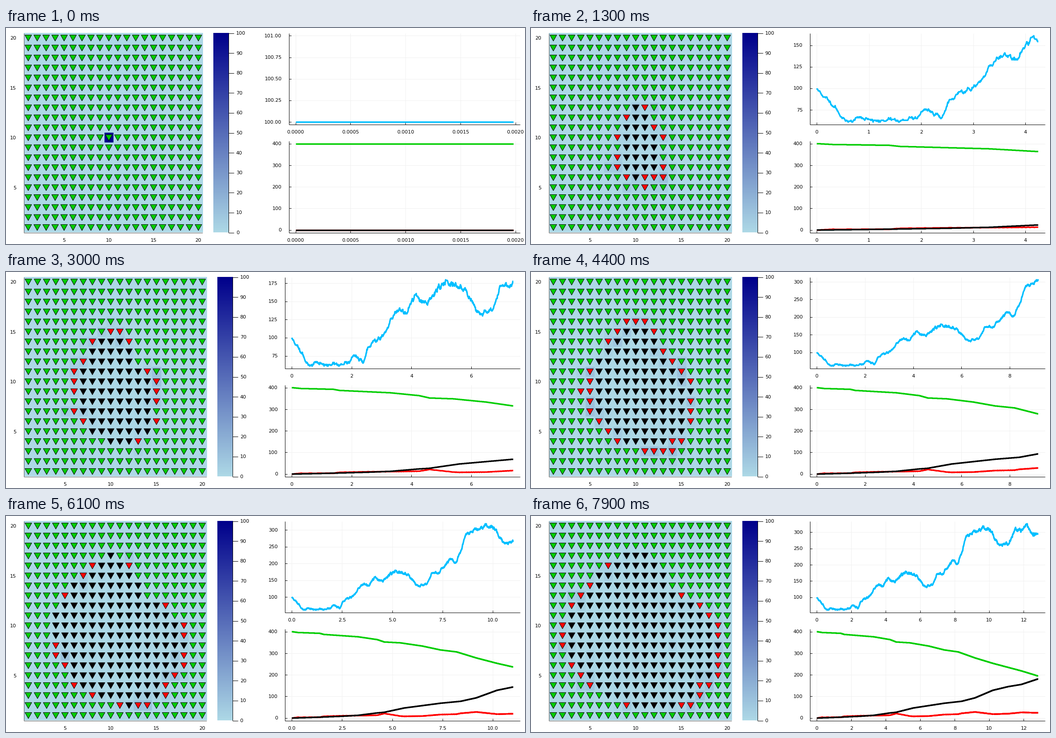
A matplotlib script for the animation above (8 s loop, 1159x483 px).

```python
import math

import matplotlib.pyplot as plt
import numpy as np
from matplotlib.animation import FuncAnimation
from matplotlib.collections import LineCollection, PolyCollection
from matplotlib.colors import LinearSegmentedColormap

W, H, DPI = 1159, 483, 128
PX = 72 / DPI
FRAMES, INTERVAL = 80, 100
N = 20
GREEN, RED, BLACK, BLUE = "#00cd00", "#ff0000", "#000000", "#00bfff"
HEAT = LinearSegmentedColormap.from_list("heat", ["#add8e6", "#00008b"])
rng = np.random.default_rng(7)

# Turning points as (time, count)
BEETLES = np.array([
    (0, 100), (.2, 88), (.62, 60), (.85, 66), (1, 62), (1.75, 63), (2.1, 76),
    (2.4, 67), (2.5, 81), (2.77, 98), (2.95, 97), (3.5, 138), (3.85, 134),
    (4.15, 159), (4.4, 146), (5.15, 178), (5.7, 168), (6.3, 131),
    (6.75, 143), (7, 173), (7.35, 176), (7.9, 214), (8.2, 204), (8.68, 286),
    (9.65, 314), (10.05, 308), (10.55, 259), (11.1, 264), (11.5, 309),
    (11.86, 304), (12.2, 327), (12.45, 293), (12.84, 294),
])
INFESTED = np.array([
    (0, 0), (.3, 4), (1.4, 8), (1.6, 13), (3.3, 24), (4.25, 37), (4.6, 48),
    (5.4, 52), (6.5, 67), (7.4, 85), (8.2, 94), (9.18, 122), (10.21, 147),
    (11.86, 182), (12.84, 206),
])
DEAD = np.array([
    (0, 0), (1, 3), (2.5, 8.5), (3.3, 13), (4.25, 24), (4.6, 27), (5.6, 47),
    (7.4, 69), (8.4, 78), (9.18, 94), (10.21, 129), (11.1, 146),
    (11.86, 156), (12.84, 182),
])
# Animation step against simulated time
PACE = np.array([(0, 0), (13, 4.245), (30, 7.4), (44, 9.18), (54, 10.21),
                 (69, 11.86), (79, 12.84)])
# How far the outbreak reaches at angles 0, 45, ... 315 degrees
REACH = [9.2, 5.5, 8.6, 7, 8.7, 7.5, 7.7, 9.5]


def rank(key):
    order = np.empty(N * N, int)
    order[np.argsort(key.ravel())] = np.arange(1, N * N + 1)
    return order.reshape(N, N)


def schedule():
    """Spread outward from the middle, vertically faster at first."""
    y, x = np.mgrid[1:N + 1, 1:N + 1]
    dx, dy = x - 10.3, y - 9.3
    angle = np.degrees(np.arctan2(dy, dx))
    reach = np.interp(angle, np.arange(0, 360, 45), REACH, period=360)
    power = 1.5 + 1.4 * np.sin(np.radians(angle)) ** 2
    arrival = (np.hypot(dx, dy) / reach) ** power
    hit_rank = rank(arrival + rng.uniform(-.05, .05, (N, N)))
    died_rank = rank(hit_rank * rng.uniform(.93, 1.07, (N, N)))
    hit_at = np.interp(hit_rank, INFESTED[:, 1], INFESTED[:, 0],
                       right=np.inf)
    died_at = np.interp(died_rank, DEAD[:, 1], DEAD[:, 0], right=np.inf)
    return hit_at, np.maximum(died_at, hit_at + .05)


def beetle_walk(t):
    """Beetle count with small correlated jitter."""
    noise = np.zeros(len(t))
    for i in range(1, len(t)):
        noise[i] = .85 * noise[i - 1] + rng.normal(0, .9)
    base = np.interp(t, *BEETLES.T)
    jitter = noise * np.sqrt(base / 100) * np.minimum(1, t / .15)
    return np.maximum(58, np.round(base + jitter))


def step_times():
    """Each step covers equal activity, so time slows as beetles multiply."""
    activity = np.cumsum(POP)
    marks = np.interp(PACE[:, 1], T, activity)
    times = np.interp(np.interp(np.arange(FRAMES), PACE[:, 0], marks),
                      activity, T)
    times[0] = .00198
    return times


HIT_AT, DIED_AT = schedule()
T = np.arange(0, 12.845, .008)
POP = beetle_walk(T)
N_HIT = np.searchsorted(np.sort(HIT_AT.ravel()), T, side="right")
N_DEAD = np.searchsorted(np.sort(DIED_AT.ravel()), T, side="right")
TIMES = step_times()
GRAIN = rng.gamma(2, .5, (N, N))
PHASE = rng.uniform(0, 2 * math.pi, (N, N))


def heat(f, t, sick, dead):
    """Beetles per cell: gathered around infested trees."""
    start = np.zeros((N, N))
    start[9, 9] = 100
    if f == 0:
        return start
    p = np.pad(sick.astype(float), 1)
    near = p[:-2, 1:-1] + p[2:, 1:-1] + p[1:-1, :-2] + p[1:-1, 2:]
    weight = sick + .3 * near + .12 * dead + .005
    weight = weight * GRAIN * (1 + .5 * np.sin(.6 * f + PHASE))
    crowd = np.minimum(10, np.interp(t, T, POP) * weight / weight.sum())
    left = math.exp(-t / .3)
    return left * start + (1 - left) * crowd


def nice_ticks(lo, hi):
    """Pick 4 to 8 ticks by granularity, zero, coverage and niceness."""
    span = hi - lo
    best, best_score = [], -1
    z = math.ceil(math.log10(span))
    while 16 * 10.0 ** (z + 1) > span:
        for k in range(4, 17):
            for q, nice in ((1, 1), (5, .9), (2, .7), (2.5, .5), (3, .2)):
                step = q * 10.0 ** z
                width = (k - 1) * step
                if width >= 2 * span:
                    continue
                r = math.ceil((hi - width) / step)
                while r * step <= lo:
                    marks = [i * step for i in range(r, r + k)
                             if lo <= i * step <= hi]
                    n = len(marks)
                    if 4 <= n <= 8:
                        score = ((1 - abs(n - 5) / 5) / 4
                                 + (r <= 0 < r + k) / 6
                                 + .5 * span / ((n - 1) * step) + nice / 4)
                        if score > best_score + 1e-9:
                            best, best_score = marks, score
                    r += 1
        z -= 1
    return best


def labels(marks):
    tol = 1e-6 * (marks[1] - marks[0])
    d = 0
    while any(abs(round(m, d) - m) > tol for m in marks):
        d += 1
    return [f"{m:.{d}f}" for m in marks]


def label_width(s):
    return sum(3.5 if c == "." else 7 for c in s)


fig = plt.figure(figsize=(W / DPI, H / DPI), dpi=DPI, facecolor="white")
ax = fig.add_axes([0, 0, 1, 1])


def text(x, y, s, ha="center"):
    ax.text(x, y, s, ha=ha, va="center_baseline", fontsize=11 * PX,
            family="DejaVu Sans", color="black")


def lines(segments, color="black", width=1.0, z=3):
    ax.add_collection(LineCollection(segments, colors=color,
                                     linewidths=width * PX, zorder=z))


def forest(f, t, right):
    left, top, bottom = 39.5, 11.5, 457.5
    dx, dy = (right - left) / N, (bottom - top) / N
    dead = DIED_AT <= t + .004
    sick = (HIT_AT <= t + .004) & ~dead
    ax.imshow(heat(f, t, sick, dead), cmap=HEAT, vmin=0, vmax=100,
              origin="lower", extent=(left, right, bottom, top),
              aspect="auto", interpolation="nearest")
    lines([[(left, top), (left, bottom)], [(left, bottom), (right, bottom)]],
          "#555555")
    shape = np.array([(-7.3, -6.9), (7.7, -6.9), (.2, 6.5)])
    trees, fills = [], []
    for j in range(N):
        for i in range(N):
            trees.append(shape + (left + (i + .5) * dx,
                                  bottom - (j + .5) * dy))
            fills.append(BLACK if dead[j, i] else
                         RED if sick[j, i] else GREEN)
    ax.add_collection(PolyCollection(trees, facecolors=fills, zorder=4,
                                     edgecolors="black", linewidths=PX))
    for v in (5, 10, 15, 20):
        text(left + (v - .5) * dx, 473.5, str(v))
        text(23, bottom - (v - .5) * dy - .5, str(v), "right")


def colorbar(left):
    right, top, bottom = left + 34.5, 11.5, 457.5
    ax.imshow(np.linspace(0, 1, 256)[:, None], cmap=HEAT, origin="lower",
              extent=(left, right, bottom, top), aspect="auto")
    segs = [[(right, top), (right, bottom)]]
    for v in range(0, 101, 10):
        y = bottom - v / 100 * (bottom - top)
        segs.append([(right, y), (right + 11.5, y)])
        text(right + 16.5, y - .5, str(v), "left")
    lines(segs)


def chart(left, top, bottom, xlim, ylim, xticks, yticks, curves):
    right = 1147.5

    def sx(v):
        return left + (v - xlim[0]) / (xlim[1] - xlim[0]) * (right - left)

    def sy(v):
        return bottom - (v - ylim[0]) / (ylim[1] - ylim[0]) * (bottom - top)

    grid = []
    segs = [[(left, top), (left, bottom)], [(left, bottom), (right, bottom)]]
    for v, s in zip(xticks, labels(xticks)):
        x = sx(v)
        grid.append([(x, top), (x, bottom)])
        segs.append([(x, bottom), (x, bottom - 5)])
        text(x, bottom + 16, s)
    for v, s in zip(yticks, labels(yticks)):
        y = sy(v)
        grid.append([(left, y), (right, y)])
        segs.append([(left, y), (left + 5, y)])
        text(left - 16.5, y - .5, s, "right")
    lines(grid, "#f0f0f0", z=1)
    lines(segs, z=2)
    for x, y, color in curves:
        ax.plot(sx(x), sy(y), color=color, lw=3.4 * PX, zorder=5,
                solid_capstyle="butt", solid_joinstyle="round")


def widen(lo, hi):
    pad = .03 * (hi - lo)
    return lo - pad, hi + pad


def draw(f):
    ax.clear()
    t = TIMES[f]
    n = max(1, np.searchsorted(T, t))

    def trail(values):
        return np.append(values[:n], values[n - 1])

    x = np.append(T[:n], t)
    pop, hit, dead = trail(POP), trail(N_HIT), trail(N_DEAD)
    xlim = widen(0, t)
    ylim = widen(pop.min(), max(pop.max(), pop.min() + 1))
    xticks, yticks = nice_ticks(*xlim), nice_ticks(*ylim)

    # Wide tick labels squeeze both columns equally.
    widest = max(label_width(s) for s in labels(yticks))
    squeeze = max(0, widest - 21) / 2
    forest(f, t, 448.2 - squeeze)
    colorbar(471.7 - squeeze)
    left = 623.3 + squeeze
    chart(left, 11.5, 216, xlim, ylim, xticks, yticks, [(x, pop, BLUE)])
    chart(left, 253, 457.5, xlim, widen(0, 400), xticks,
          [0, 100, 200, 300, 400],
          [(x, N * N - hit, GREEN), (x, hit - dead, RED), (x, dead, BLACK)])
    ax.set_xlim(0, W)
    ax.set_ylim(H, 0)
    ax.axis("off")
    return []


anim = FuncAnimation(fig, draw, frames=FRAMES, interval=INTERVAL,
                     repeat=True, repeat_delay=0, blit=False)
plt.show()
```
